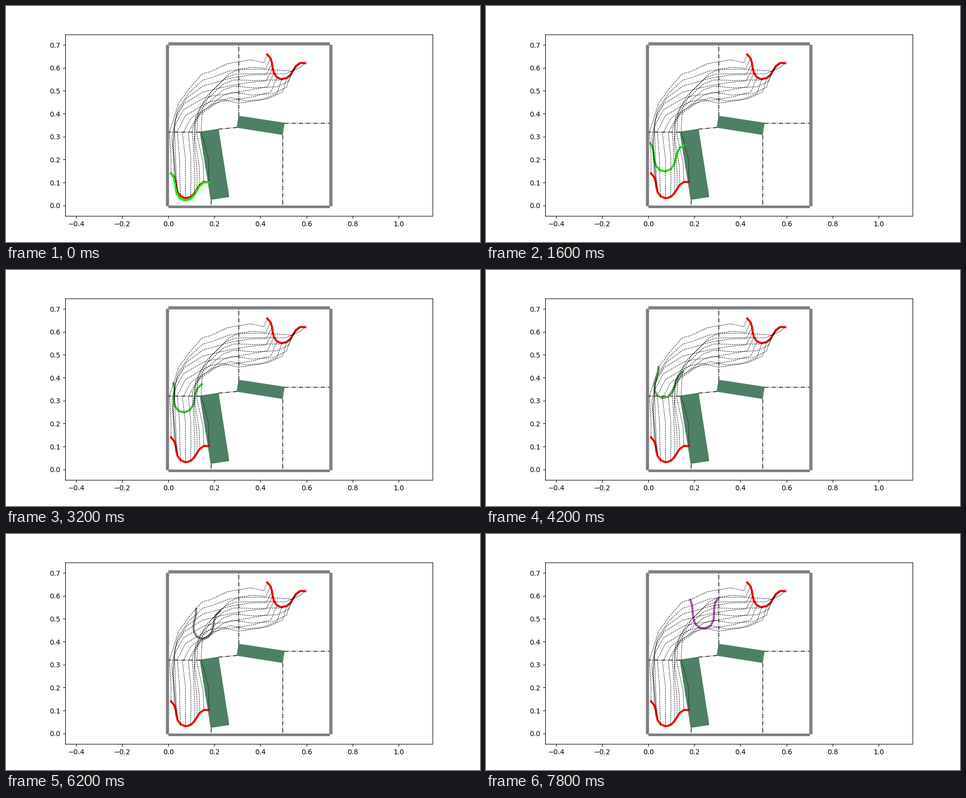
These frames come from a looping animation (960x480 px, 8000 ms). A matplotlib script:

```python
import numpy as np
import matplotlib.pyplot as plt
from matplotlib.animation import FuncAnimation
from matplotlib.patches import Polygon, Rectangle

FRAMES, STEP_MS = 40, 200
TOTAL_STEPS = 60           # steps for the whole trip; the loop shows the first 40
SCALE = 369.6 / 0.792      # stage pixels per data unit
X0, Y0 = 328.17, 405.23    # stage position of the data origin
SEGMENTS = 12


def to_data(xy):
    xy = np.asarray(xy, float)
    return np.stack([xy[..., 0] - X0, Y0 - xy[..., 1]], -1) / SCALE


def rope(x, y, length, curl, tilt):
    """U-shaped rope through (x, y) at its middle, built from segment headings."""
    s = np.linspace(-1, 1, SEGMENTS)
    heading = -(78 - 0.2 * curl) * np.sin(2.6 * s) - curl * s + 22 * s**2 + tilt
    angle = np.radians(heading)
    steps = length * np.stack([np.cos(angle), np.sin(angle)], -1)
    nodes = np.vstack([[0, 0], np.cumsum(steps, axis=0)])
    return to_data(nodes - nodes[SEGMENTS // 2] + [x, y])


start = rope(363, 390.5, 10.4, -18, 4)
goal = rope(558, 148.5, 10.4, -18, 4)

# Key poses by step: middle x, y, segment length, curl, tilt
keys = {
    0: rope(362, 395, 11, -12, 4),
    4: rope(363, 359.5, 11.9, 0, 0),
    12: rope(363, 312.5, 12.1, 16, -10),
    21: rope(357, 260, 12, 31, 6),
    27: rope(374, 227.5, 12, 38, 9),
    35: rope(421, 198, 12.2, 26, -7),
    39: rope(444, 192, 12.4, 23, -11),
    45: rope(471, 197, 15.5, 20, 2),
    51: rope(515, 191, 15.5, 12, 8),
    56: rope(548, 178, 12.5, 8, 0),
    TOTAL_STEPS: goal,
}
times = list(keys)
poses = np.array(list(keys.values()))
traces = np.swapaxes([start, *poses[1:]], 0, 1)


def rope_at(step):
    i = np.searchsorted(times, step, side="right") - 1
    t = (step - times[i]) / (times[i + 1] - times[i])
    return (1 - t) * poses[i] + t * poses[i + 1]


fig, ax = plt.subplots(figsize=(9.6, 4.8), dpi=100)
ax.set_position([0.125, 0.11, 0.775, 0.77])
half = 744 / SCALE / 2
ax.set_xlim(0.35 - half, 0.35 + half)
ax.set_ylim(-0.046, 0.746)

# Walls
for x, y, w, h in [(-0.01, 0, 0.01, 0.7), (0.7, 0, 0.01, 0.7),
                   (0, -0.01, 0.7, 0.01), (0, 0.7, 0.7, 0.01)]:
    ax.add_patch(Rectangle((x, y), w, h, color="gray"))

# Obstacles
tall = to_data([(392.5, 255.7), (429.5, 250), (451, 387.5), (414.5, 393)])
wide = to_data([(471, 223.5), (563, 237.5), (559.5, 261), (467.5, 246.5)])
for corners in (tall, wide):
    ax.add_patch(Polygon(corners, color="#4e8066"))

# Passages between obstacles and walls
for a, b in [(tall[0], (0, tall[0][1])), (tall[1], wide[3]),
             (wide[0], (wide[0][0], 0.7)), (wide[1], (0.7, wide[1][1])),
             (wide[2], (wide[2][0], 0)), (tall[3], (tall[3][0], 0))]:
    ax.plot(*zip(a, b), "k-.", lw=1)

for shape in (start, goal):
    ax.plot(*shape.T, "r", lw=3)
moving, = ax.plot([], [], lw=3)
for trace in traces:
    ax.plot(*trace.T, "k--", lw=0.6)


def update(step):
    t = step / TOTAL_STEPS
    moving.set_data(*rope_at(step).T)
    moving.set_color((t, 1 - t, t))
    return moving,


anim = FuncAnimation(fig, update, frames=FRAMES, interval=STEP_MS,
                     repeat=True, repeat_delay=0)
plt.show()
```
